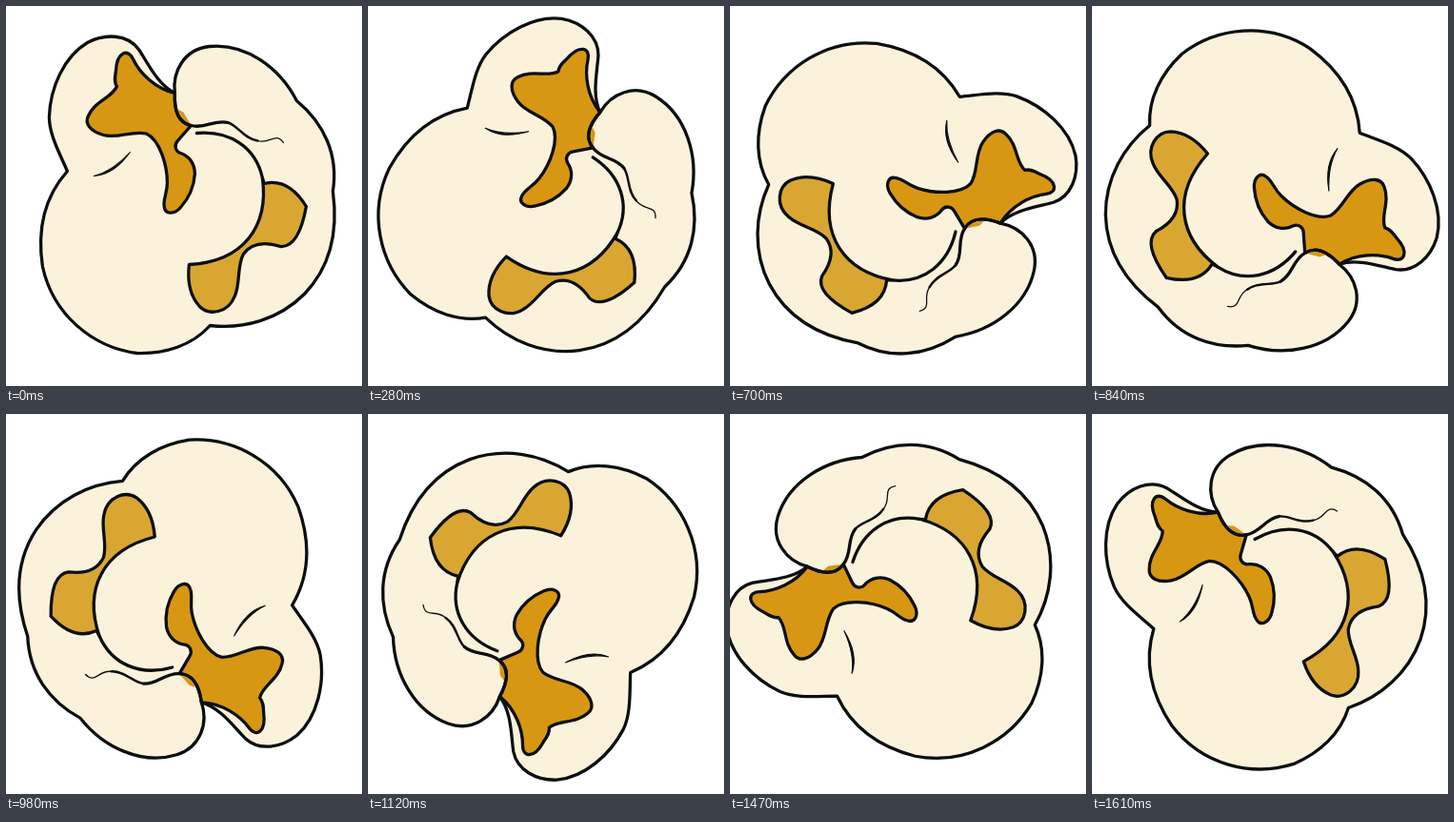
Animation, 374 px wide and 399 px high, one loop 1.68 s. Source, as an HTML page with a canvas:

```html
<!DOCTYPE html>
<html lang="en">
<head>
<meta charset="utf-8">
<title>Tumbling popcorn</title>
<style>
  html, body { margin: 0; width: 100%; height: 100%; overflow: hidden; background: #fff; }
  canvas { display: block; }
</style>
</head>
<body>
<canvas id="stage" width="374" height="399"></canvas>
<script>
const ctx = document.getElementById('stage').getContext('2d');
const STEP = 70, STEPS = 24;
const CENTER = { x: 181.2, y: 198.5 };
const PIVOT = { x: 181.8, y: 200 };
const INK = '#0c0f10', CREAM = '#fbf2dc', DARK = '#d79713', LIGHT = '#d9a632';
const LINE = 3.3;

// [step, degrees]: the turn speeds up towards the end of the loop
const TURN = [[0, 0], [4, 37.8], [8, 84.4], [12, 134.8], [16, 205.6], [21, 293], [23, 334.9], [24, 360]];

const body = new Path2D(`M65 175 C57 156 46 137 46 118 C47 88 61 55 86 40
  C105 30 128 31 140 47 C150 62 160 84 178 93
  C175 70 188 47 214 44 C252 40 288 66 306 101
  C335 125 350 158 344 196 C350 240 341 276 314 304
  C287 331 250 341 215 337 C196 358 168 367 138 366
  C92 360 50 326 39 275 C33 235 41 202 65 175 Z`);

const kernel = new Path2D(`M116 70 C117 49 129 46 134 57 C141 72 157 88 178 93
  C177 111 182 124 195 127 L181 143 C177 147 178 154 184 156
  C193 159 199 167 199 178 C198 192 192 204 184 213
  C177 221 168 220 167 213 C165 205 170 199 170 187
  C170 168 162 142 148 135.5 C133 132 118 141 103 137
  C89 133 83 125 87 117 C94 101 112 98 117 86 C114 81 115 76 116 70 Z`);

const sliver = new Path2D('M181 110 L187 113 L194 125 C187 123 183 117 181 110 Z');

const hull = new Path2D(`M270 182 L272 188 C288 184 303 191 316 212 C312 234 304 255 289 254
  C270 248 258 251 250 262 C243 275 247 292 241 306
  C234 324 214 327 204 317 C194 306 191 290 193 273
  C250 270 277 233 270 182 Z`);

const fold = new Path2D('M201 135 C236 132 263 150 270 182');
const rim = new Path2D('M178 93 C177 111 182 124 195 127 C210 131 220 120 234 124');
const rimEnd = new Path2D('M234 124 C244 127 251 141 265 143');
const tail = new Path2D('M265 143 C278 147 284 133 292 145');
const crease = new Path2D('M93 180 C108 176 120 167 131 155 C121 169 109 179 93 180 Z');

function angleAt(step) {
  const i = Math.max(1, TURN.findIndex(k => k[0] >= step));
  const slope = k => {
    const a = TURN[Math.max(0, k - 1)], b = TURN[Math.min(TURN.length - 1, k + 1)];
    return (b[1] - a[1]) / (b[0] - a[0]);
  };
  const [n0, d0] = TURN[i - 1], [n1, d1] = TURN[i];
  const span = n1 - n0, u = (step - n0) / span, v = 1 - u;
  return v * v * (1 + 2 * u) * d0 + u * u * (3 - 2 * u) * d1
    + span * u * v * (v * slope(i - 1) - u * slope(i));
}

function shape(path, fill, width) {
  if (fill) {
    ctx.fillStyle = fill;
    ctx.fill(path);
  }
  if (width) {
    ctx.lineWidth = width;
    ctx.stroke(path);
  }
}

function draw(now) {
  const step = Math.floor(now / STEP) % STEPS;
  ctx.setTransform(1, 0, 0, 1, 0, 0);
  ctx.fillStyle = '#fff';
  ctx.fillRect(0, 0, 374, 399);
  ctx.translate(CENTER.x, CENTER.y);
  ctx.rotate(angleAt(step) * Math.PI / 180);
  ctx.translate(-PIVOT.x, -PIVOT.y);
  ctx.strokeStyle = INK;
  ctx.lineCap = ctx.lineJoin = 'round';

  shape(body, CREAM, LINE);
  shape(hull, LIGHT, LINE);
  shape(kernel, DARK, LINE);
  shape(sliver, DARK);
  shape(fold, null, LINE);
  shape(rim, null, LINE);
  shape(rimEnd, null, 2.4);
  shape(tail, null, 1.3);
  shape(crease, INK, 1.1);
}

function loop() {
  draw(performance.now());
  requestAnimationFrame(loop);
}
loop();
</script>
</body>
</html>
```
